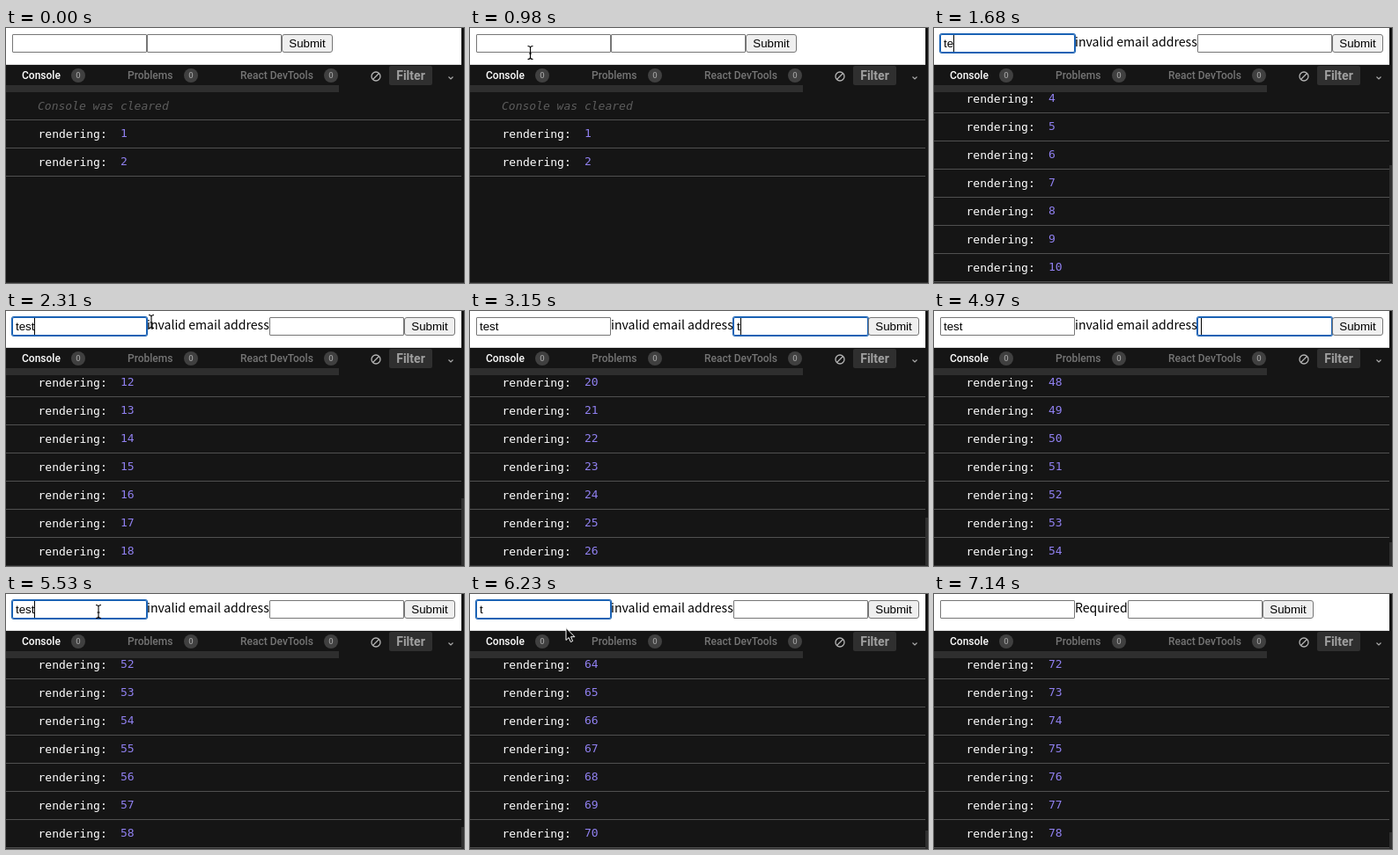
An HTML page for the animation above (7280 ms loop, 520x290 px).

```html
<!DOCTYPE html>
<html lang="en">
<head>
<meta charset="utf-8">
<title>Form rendering log</title>
<style>
  html, body { margin: 0; width: 100%; height: 100%; overflow: hidden; background: #151515; }
  #stage { position: relative; width: 520px; height: 290px; overflow: hidden; background: #151515; }
  #stage div, #stage span, #stage svg { position: absolute; box-sizing: border-box; white-space: pre; }
  #page { left: 0; top: 0; width: 517px; height: 42px; background: #fff; border-bottom: 1px solid #ddd; }
  #stage .field { top: 7px; width: 153px; height: 21px; border: 1px solid #767676; background: #fff; border-radius: 1px; }
  #stage .field.on { border-color: #fff; box-shadow: 0 0 0 1px #1a62b4, inset 0 0 0 1px #1a62b4; border: 0; border-radius: 2px; }
  .field, #submit { font: 13.333px/19px "Liberation Sans", Arial, sans-serif; color: #000; }
  .field .value { left: 4px; top: 1px; height: 19px; }
  .field.on .caret .value { border-right: 1px solid #000; }
  .field.on.caret .value { border-right: 1px solid #000; }
  #message { left: 160px; top: 5px; font: 14.1px/21px "Noto Sans CJK JP", "Noto Sans CJK SC", "Open Sans", sans-serif; color: #000; }
  #submit { top: 7px; width: 58px; height: 21px; background: #efefef; border: 1px solid #767676; border-radius: 3px; text-align: center; }
  #log { left: 0; top: 73px; width: 517px; height: 216px; overflow: hidden; }
  .row { left: 0; width: 517px; height: 32px; border-bottom: 1px solid #505050; font: 13px/32px "DejaVu Sans Mono", monospace; color: #fff; }
  .row span { left: 36.5px; top: 0; }
  .row .count { left: 130px; top: -1px; color: #9080f0; }
  .row.note span { left: 36px; color: #5c5c5c; font-style: italic; }
  #tabs { left: 0; top: 42px; width: 520px; height: 31px; background: #151515; }
  #tabs span { top: 4px; font: 500 12px/16px Roboto, sans-serif; color: #757575; }
  #tabs .first { color: #fff; }
  #tabs .badge { top: 4px; width: 16px; height: 16px; border-radius: 8px; background: #404040; color: #999; font-size: 9.5px; text-align: center; }
  #rail { left: 0; top: 23px; width: 378px; height: 8px; background: #2e2e2e; }
  #filter { left: 435px; top: 1px; width: 49px; height: 22px; background: #2f2f2f; border-radius: 2px;
    font: 700 14px/22px Roboto, sans-serif; color: #a0a0a0; text-align: center; }
  #thumb { left: 517px; width: 3px; background: #303030; }
  #edge { left: 0; top: 289px; width: 520px; height: 1px; background: #2b2b2b; }
  #cursor { left: 0; top: 0; overflow: visible; }
</style>
</head>
<body>
<div id="stage">
  <div id="page">
    <div class="field" style="left:7px"><span class="value"></span></div>
    <span id="message"></span>
    <div class="field"><span class="value"></span></div>
    <div id="submit">Submit</div>
  </div>
  <div id="log"></div>
  <div id="tabs">
    <div id="rail"></div>
    <span class="first" style="left:18px">Console</span><span class="badge" style="left:74px">0</span>
    <span style="left:138px">Problems</span><span class="badge" style="left:202px">0</span>
    <span style="left:266px">React DevTools</span><span class="badge" style="left:361px">0</span>
    <svg style="left:414px;top:7px" width="12" height="12" fill="none" stroke="#b5b5b5" stroke-width="1.3">
      <circle cx="6" cy="6" r="5"/><path d="M2.5 9.5l7-7"/>
    </svg>
    <div id="filter">Filter</div>
    <svg style="left:501px;top:12px" width="8" height="6" fill="none" stroke="#aaa" stroke-width="1.2"><path d="M1.5 1.5l2.5 2.5 2.5-2.5"/></svg>
  </div>
  <div id="thumb"></div>
  <div id="edge"></div>
  <svg id="cursor" width="1" height="1">
    <path id="arrow" d="M0 0v14l3.2-3 2.1 5 2.3-1-2.1-4.8h4.4z" fill="#000" stroke="#fff" stroke-width="1"/>
    <path id="beam" d="M-3-7.5q3 0 3 2v11q0 2-3 2M3-7.5q-3 0-3 2v11q0 2 3 2M-1.5 1h3" fill="none" stroke="#000" stroke-width="1.1"/>
  </svg>
</div>
<script>
const LOOP = 7280, TICK = 70, ROW = 32, TOP = 72, BOTTOM = 288;
const $ = id => document.getElementById(id);
const messages = [['', 0], ['invalid email address', 139], ['Required', 60]];

// time, render count, first value, second value, focused field, message
const steps = [
  [0, 2, '', '', 0, 0], [1050, 2, '', '', 1, 0],
  [1470, 4, 't', '', 1, 1], [1540, 6, 't', '', 1, 1], [1680, 10, 'te', '', 1, 1],
  [1820, 12, 'tes', '', 1, 1], [1890, 14, 'tes', '', 1, 1], [2100, 18, 'test', '', 1, 1],
  [2590, 18, 'test', '', 2, 1], [2660, 20, 'test', '', 2, 1], [2730, 22, 'test', '', 2, 1],
  [3150, 26, 'test', 't', 2, 1], [3290, 28, 'test', 'te', 2, 1], [3360, 30, 'test', 'te', 2, 1],
  [3500, 34, 'test', 'tes', 2, 1], [3710, 38, 'test', 'test', 2, 1], [4270, 42, 'test', 'tes', 2, 1],
  [4410, 44, 'test', 'te', 2, 1], [4480, 46, 'test', 'te', 2, 1], [4620, 48, 'test', 't', 2, 1],
  [4690, 50, 'test', 't', 2, 1], [4830, 52, 'test', '', 2, 1], [4900, 54, 'test', '', 2, 1],
  [5390, 54, 'test', '', 1, 1], [5460, 56, 'test', '', 1, 1], [5530, 58, 'test', '', 1, 1],
  [5810, 60, 'tes', '', 1, 1], [5880, 62, 'tes', '', 1, 1], [6020, 66, 'te', '', 1, 1],
  [6160, 70, 't', '', 1, 1], [6300, 72, '', '', 1, 2], [6370, 74, '', '', 1, 2],
  [7140, 78, '', '', 0, 2]
];

// time, x, y, shape, hold until the next point
const path = [
  [0, 0, 0, ''], [70, 229, 235, 'arrow'], [280, 130, 112, 'arrow'], [420, 72, 40, 'arrow'],
  [490, 62.5, 27, 'beam', 1], [700, 68.5, 27, 'beam', 1], [980, 68.5, 28, 'beam', 1], [1470, 0, 0, ''],
  [2170, 68.5, 28, 'beam'], [2310, 165, 12, 'beam'], [2450, 285, 8, 'beam'], [2590, 340.5, 13, 'beam', 1], [3150, 0, 0, ''],
  [3990, 340.5, 13, 'beam', 1], [4270, 0, 0, ''],
  [5040, 320, 13, 'beam'], [5180, 225, 16, 'beam'], [5390, 105, 20, 'beam', 1], [5810, 0, 0, ''],
  [6090, 105, 20, 'beam'], [6160, 107, 26, 'beam'], [6230, 109, 38.5, 'arrow'], [6370, 112, 150, 'arrow'],
  [6580, 98.5, 283.5, 'arrow', 1], [6720, 0, 0, '']
];

const fields = [...document.querySelectorAll('.field')];
const rows = Array.from({ length: 8 }, () => {
  const row = document.createElement('div');
  row.innerHTML = '<span></span><span class="count"></span>';
  $('log').append(row);
  return row;
});

const lastIndex = (list, t) => list.findLastIndex(item => item[0] <= t);

function drawForm(values, focus, message, caret) {
  const [text, width] = messages[message];
  $('message').textContent = text;
  fields[1].style.left = 160 + width + 'px';
  $('submit').style.left = 313 + width + 'px';
  fields.forEach((field, i) => {
    const on = focus === i + 1;
    field.className = 'field' + (on ? ' on' : '') + (on && caret ? ' caret' : '');
    const value = field.firstChild;
    value.textContent = values[i];
    value.style.left = on ? '4px' : '3px';
    value.style.top = on ? '1px' : '0';
  });
}

function drawLog(count) {
  const height = ROW * (count + 1);
  const nudge = count > 14 && count < 58 ? 1 : 0;
  const scroll = Math.max(0, TOP + height - BOTTOM - nudge);
  const first = Math.floor(scroll / ROW);
  rows.forEach((row, i) => {
    const n = first + i;
    row.style.display = n > count ? 'none' : '';
    row.style.top = TOP + 1 + ROW * n - scroll - 73 + 'px';
    row.className = n ? 'row' : 'row note';
    row.children[0].textContent = n ? 'rendering:' : 'Console was cleared';
    row.children[1].textContent = n || '';
  });
  const thumb = height > 217 ? 217 * 217 / height : 0;
  $('thumb').style.top = 290 - thumb + 'px';
  $('thumb').style.height = thumb + 'px';
}

function drawCursor(t) {
  const i = lastIndex(path, t);
  const [start, x, y, shape, hold] = path[i];
  const next = path[i + 1];
  const k = hold || !shape || !next ? 0 : (t - start) / (next[0] - start);
  const at = k ? [x + (next[1] - x) * k, y + (next[2] - y) * k] : [x, y];
  for (const id of ['arrow', 'beam']) {
    $(id).style.display = id === shape ? '' : 'none';
    $(id).setAttribute('transform', `translate(${at})`);
  }
}

function render(time) {
  const t = Math.floor(time % LOOP / TICK) * TICK;
  const [, count, a, b, focus, message] = steps[lastIndex(steps, t)];
  drawForm([a, b], focus, message, t < 6160);
  drawLog(count);
  drawCursor(t);
}

const begin = performance.now();
function loop() {
  render(performance.now() - begin);
  requestAnimationFrame(loop);
}
loop();
</script>
</body>
</html>
```
